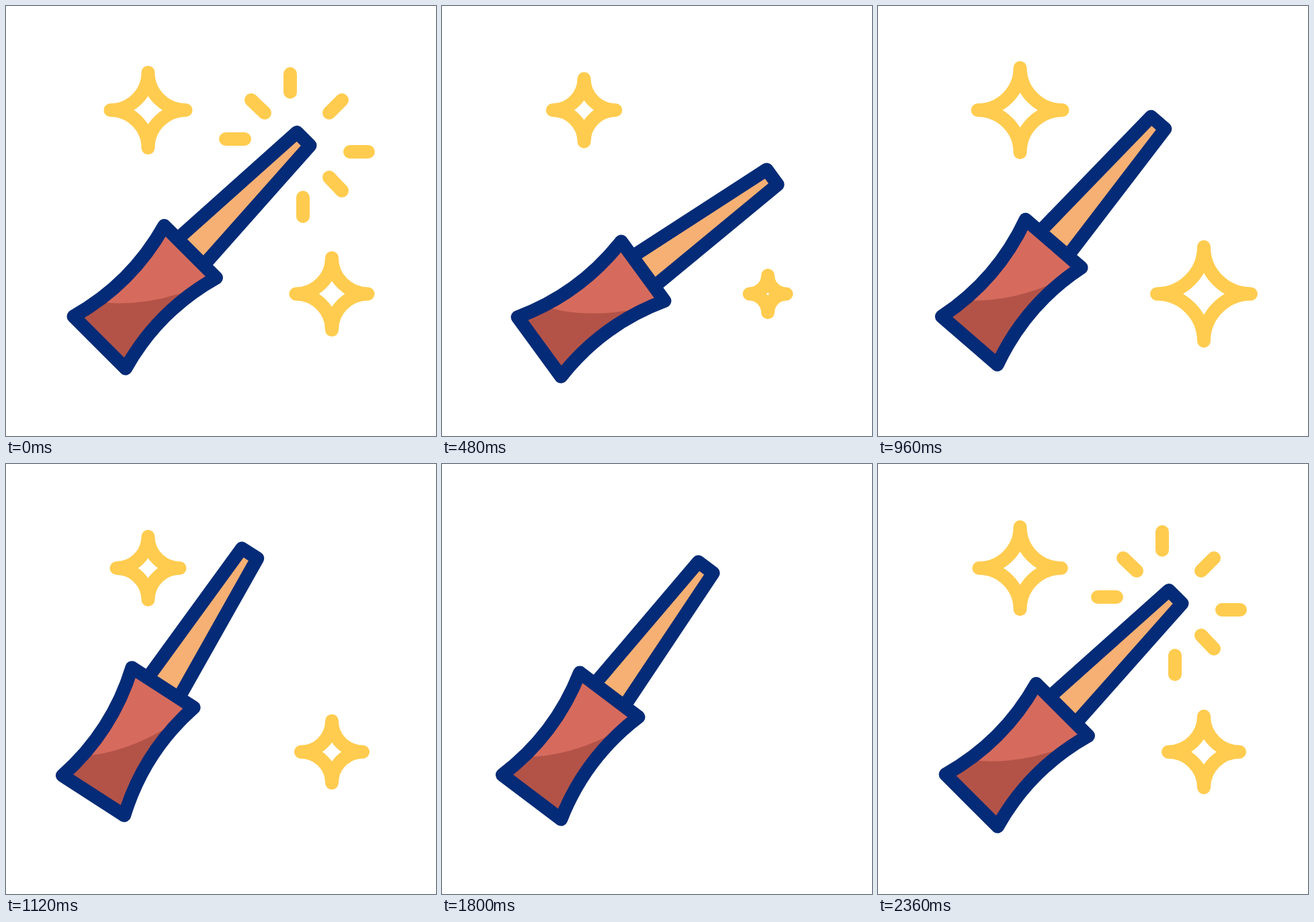
An HTML page for the animation above (2400 ms loop, 640 px wide and 640 px high).

```html
<!DOCTYPE html>
<html lang="en">
<head>
<meta charset="utf-8">
<title>Magic wand</title>
<style>
  html, body { margin: 0; width: 100%; height: 100%; overflow: hidden; background: #fff; }
  svg { display: block; width: 100%; height: 100%; }
  .line { fill: none; stroke-width: 20; stroke-linecap: round; stroke-linejoin: round; }
  .navy { stroke: #042b77; }
  .gold { stroke: #ffcc4f; }
</style>
</head>
<body>
<svg viewBox="0 0 640 640">
  <defs>
    <path id="grip" d="M100.5 462Q187 413.5 235.5 327L313 404.5Q226.5 453 178 539.5Z"/>
    <clipPath id="inside"><use href="#grip"/></clipPath>
  </defs>
  <g id="stars" class="line gold"></g>
  <path id="rays" class="line gold"/>
  <g id="wand">
    <path class="line navy" style="fill:#f6b073" d="M255 347L433 188L452.5 207.5L294 386Z"/>
    <use href="#grip" fill="#d66b5d"/>
    <path clip-path="url(#inside)" fill="#b35348" d="M80 434Q148 442 165 442.5Q218 443 270 424L330 400V560H80Z"/>
    <use href="#grip" class="line navy"/>
  </g>
</svg>
<script>
const LOOP = 2400, STEP = 40;
const $ = id => document.getElementById(id);

function ease(t, from, to) {
  const u = Math.min(1, Math.max(0, (t - from) / (to - from)));
  return u * u * (3 - 2 * u);
}

// Wand: tilt right, swing left, rest, return with a small overshoot.
const swing = [
  { at: 640, to: 10.5 }, { at: 1195, to: -13.4 }, { at: 1520, to: -12.87 },
  { at: 2220, to: 1.3 }, { at: 2320, to: 0 }
];

function tilt(t) {
  let from = 0, angle = 0;
  for (const { at, to } of swing) {
    angle += (to - angle) * ease(t, from, at);
    if (t < at) break;
    from = at;
  }
  return angle;
}

// Stars: pop up, throb around a middle size, shrink away.
const POP = 120;
const stars = [
  { x: 211.5, y: 155, beat: 328, pops: [
    { start: 840, mid: 55, amp: 8, fade: 1520, end: 1720 },
    { start: 2205, mid: 55, amp: 8, fade: 2800, end: 3200 }] },
  { x: 485, y: 428.5, beat: 308, pops: [
    { start: 840, mid: 58, amp: 12, fade: 1520, end: 1720 },
    { start: 2080, mid: 54.5, amp: 1.5, fade: 2800, end: 2960 }] }
];

function popSize(t, beat, { start, mid, amp, fade, end }) {
  const age = t - start;
  const throb = mid + amp * Math.cos(2 * Math.PI * (age - POP) / beat);
  return throb * ease(age, 0, POP) * (1 - ease(t, fade, end));
}

// The second pop of each star runs on past the loop point.
const starSize = (t, { beat, pops }) =>
  Math.max(...pops.flatMap(p => [popSize(t, beat, p), popSize(t + LOOP, beat, p)]));

function starPath(s) {
  const k = s * 0.45;
  return `M0 ${-s}C0 ${-k} ${k} 0 ${s} 0C${k} 0 0 ${k} 0 ${s}` +
    `C0 ${k} ${-k} 0 ${-s} 0C${-k} 0 0 ${-k} 0 ${-s}Z`;
}

for (const s of stars) {
  s.el = document.createElementNS('http://www.w3.org/2000/svg', 'path');
  s.el.setAttribute('transform', `translate(${s.x} ${s.y})`);
  $('stars').appendChild(s.el);
}

// Rays run from inner to outer end and are mirrored across the wand's axis.
const mirror = ([x1, y1, x2, y2]) => [640 - y1, 640 - x1, 640 - y2, 640 - x2];
const side = [[355, 198, 327, 198], [385, 159, 365, 140], [423, 128, 423, 101]];
const rays = [...side, [481, 159, 500, 140], ...side.map(mirror)];

function rayPath(tail, head) {
  if (head - tail < 0.001) return '';
  return rays.map(([x1, y1, x2, y2]) => {
    const at = u => `${x1 + (x2 - x1) * u} ${y1 + (y2 - y1) * u}`;
    return `M${at(tail)}L${at(head)}`;
  }).join('');
}

function draw(t) {
  $('wand').setAttribute('transform', `rotate(${tilt(t)} 100 540)`);

  for (const s of stars) {
    const r = starSize(t, s);
    s.el.setAttribute('d', r > 0.5 ? starPath(r) : '');
    s.el.style.strokeWidth = 20 * Math.min(1, r / 10);
  }

  const leaving = t < LOOP / 2;
  $('rays').setAttribute('d', leaving
    ? rayPath(ease(t, 40, 280), 1)
    : rayPath(0, ease(t, 2060, 2280)));
}

const start = performance.now();
function tick() {
  const t = (performance.now() - start) % LOOP;
  draw(Math.floor(t / STEP) * STEP);
  requestAnimationFrame(tick);
}
tick();
</script>
</body>
</html>
```
